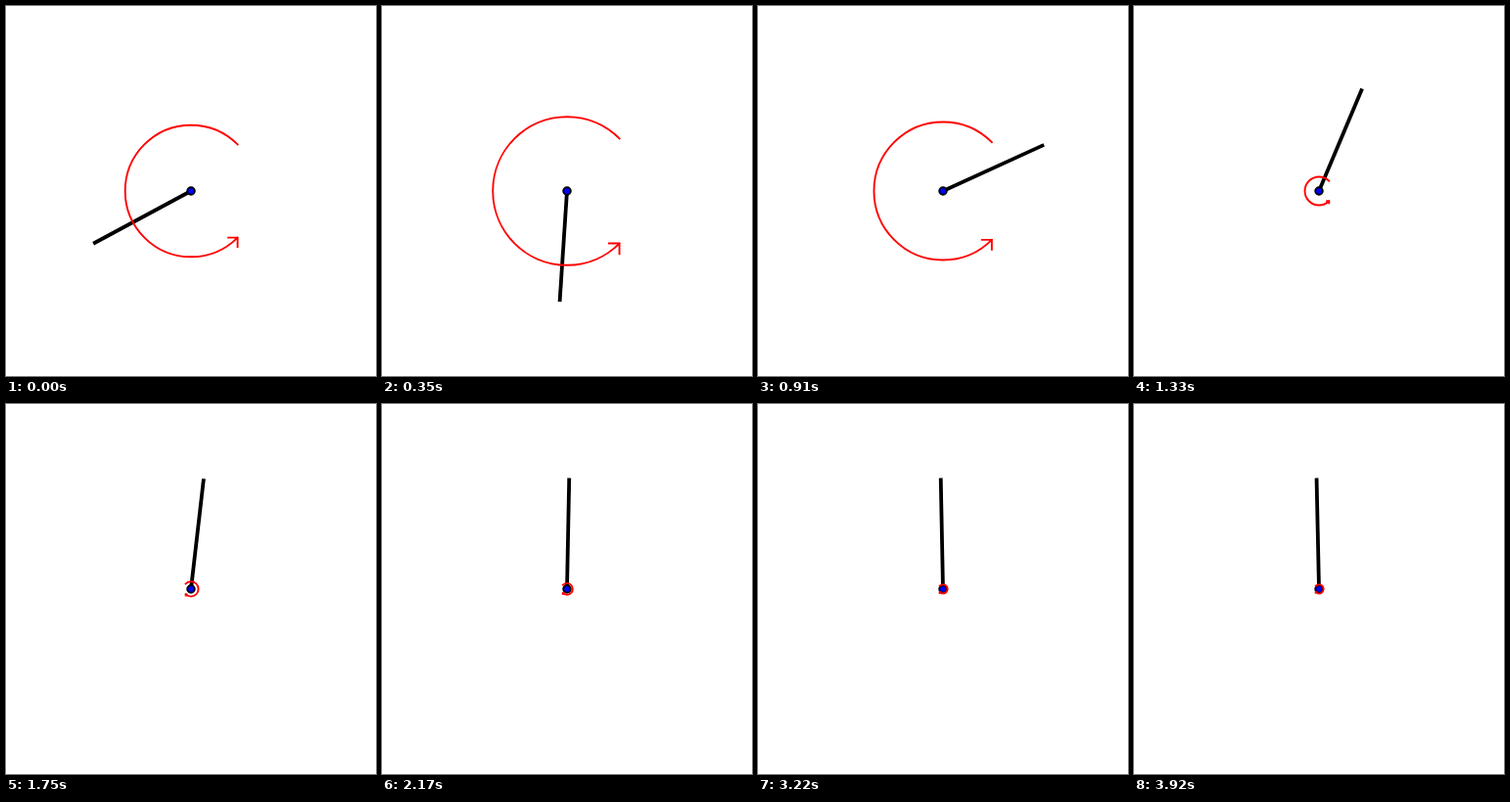
An HTML page for the animation above (8 s loop, 378 by 378 pixels).

```html
<!DOCTYPE html>
<html lang="en">
<head>
<meta charset="utf-8">
<title>Pendulum swing-up</title>
<style>
  html, body { margin: 0; width: 100%; height: 100%; overflow: hidden; background: #fff; }
  svg { display: block; width: 100%; height: 100%; }
</style>
</head>
<body>
<svg viewBox="-189 -189 378 378">
  <line id="rod" stroke="#000" stroke-width="3.8"/>
  <circle r="3.8" fill="#00f" stroke="#000" stroke-width="1.9"/>
  <path id="torque" fill="none" stroke="#f00" stroke-width="1.9" stroke-linecap="square"/>
</svg>
<script>
const LOOP = 8000, STEP = 70, LAST_STEP = 56, LENGTH = 113.4;
const START = -61.7, REST = 181.26; // degrees counterclockwise from hanging
const rod = document.getElementById('rod');
const torque = document.getElementById('torque');

// Degrees left to the rest angle: the decay rate grows smoothly to 0.21 per step
function remaining(n) {
  return (REST - START) * Math.exp(1.976 * (1 - Math.exp(-n / 10)) - 0.21 * n);
}

// Arrow radius: full push, handing over to a small opposite holding torque
function effort(n) {
  const push = 76.3 - 9 * Math.exp(-n / 1.7);
  const hold = -4.6 - 0.53 * remaining(n);
  const mix = 1 / (1 + Math.exp((17.9 - n) / 1.66));
  return push + (hold - push) * mix;
}

function draw(n) {
  const a = (REST - remaining(n)) * Math.PI / 180;
  rod.setAttribute('x2', LENGTH * Math.sin(a));
  rod.setAttribute('y2', LENGTH * Math.cos(a));

  // Negative torque mirrors the arrow
  const t = effort(n), r = Math.abs(t), s = Math.sign(t);
  const k = r * Math.SQRT1_2, h = r * 0.141;
  torque.setAttribute('d',
    `M${s * k} ${-k}A${r} ${r} 0 1 ${s > 0 ? 0 : 1} ${s * k} ${k}` +
    `M${s * (k - h)} ${k}H${s * k}V${k + h}`);
}

const start = performance.now();
function tick() {
  const t = (performance.now() - start) % LOOP;
  draw(Math.min(LAST_STEP, Math.floor(t / STEP)));
  requestAnimationFrame(tick);
}
tick();
</script>
</body>
</html>
```
